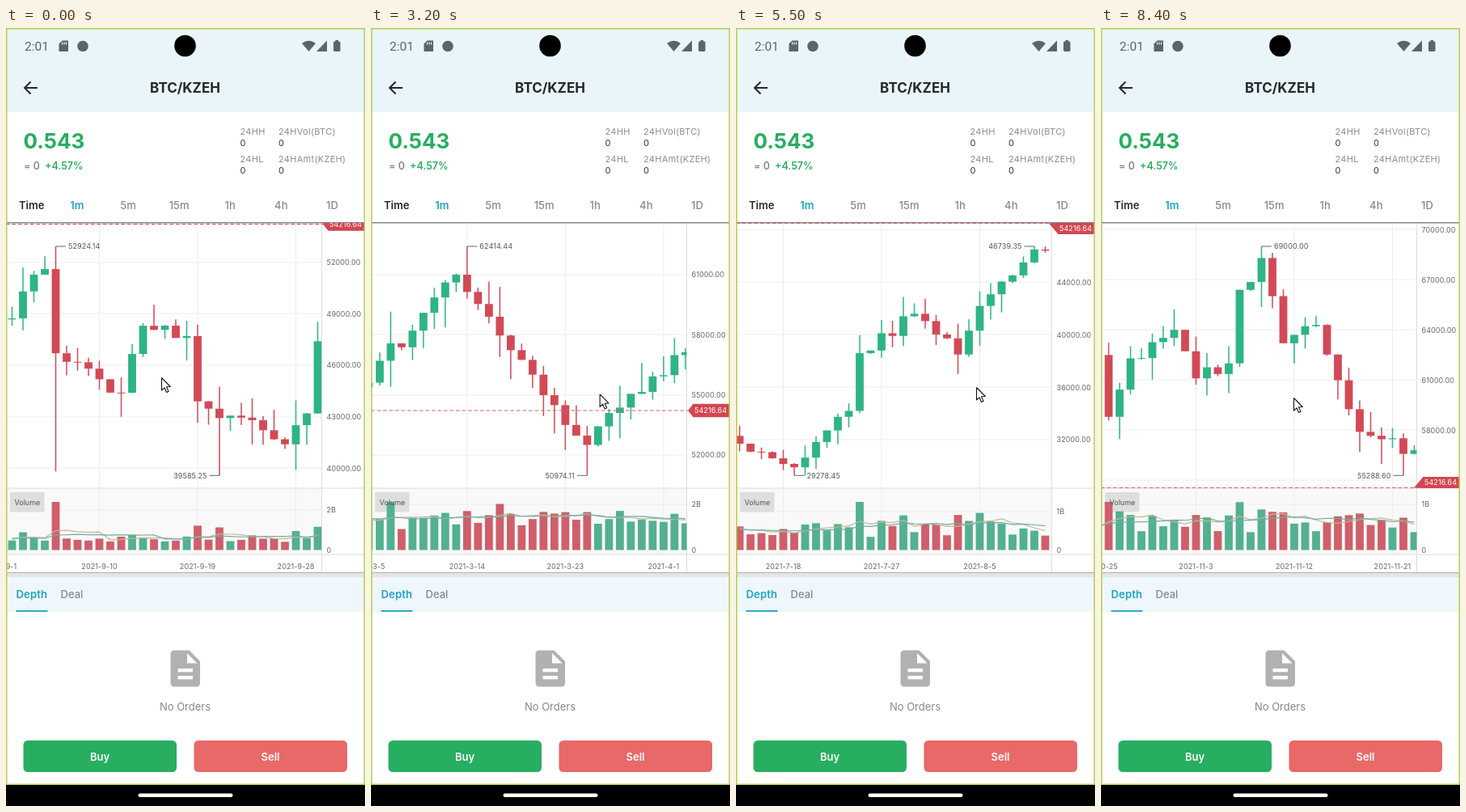
These frames come from a looping animation (444 px wide and 962 px high, 8700 ms). An HTML page with a canvas:

```html
<!DOCTYPE html>
<html lang="en">
<head>
<meta charset="utf-8">
<title>Price chart</title>
<style>
html, body { margin: 0; width: 100%; height: 100%; overflow: hidden; background: #fff; }
canvas { display: block; }
</style>
</head>
<body>
<canvas id="stage" width="444" height="962"></canvas>
<script>
const ctx = document.getElementById('stage').getContext('2d');
const LOOP = 8700, STEP = 100;
const DAYS = 291, DAY = 13.5, BODY = 9.8;
const TOP = 241, SPLIT = 569, FOOT = 651, AXIS = 390.5;
const HIGH_Y = 270, LOW_Y = 553.3, VOL_Y = 645.5, VOL_H = 59.5;
const FIRST_OPEN = 40.83, LAST_PRICE = 54.21664, TICK_ORIGIN = 40;
const UP = '#2eb486', DOWN = '#d14a56', VOL_UP = '#53b091', VOL_DOWN = '#cf5f6a';
const GREEN = '#27ae60', BLUE = '#1ba3c6', GREY = '#888', DARK = '#25282b', STATUS = '#5a646a';
const LABEL = '#666', GRID = '#ededed', EDGE = '#dcdcdc';

// Turning points of the closing price: [day, thousands]
const trend = [[0, 37.9], [1, 43.6], [2, 46.8], [8, 48], [14, 57.4], [16, 48.6], [35, 61], [47, 52.5], [66, 63],
  [75, 49.8], [77, 50.4], [82, 57.2], [92, 58.3], [94, 55.5], [100, 43], [101, 37.3], [122, 33.4], [128, 40],
  [158, 31.7], [163, 29.9], [168, 34.2], [169, 38.6], [174, 41.6], [178, 38.5], [180, 42.2], [185, 46.5],
  [206, 47.5], [211, 51.6], [212, 46.7], [218, 44.4], [220, 48.3], [224, 47.7], [225, 43.9], [233, 41.4],
  [235, 43.2], [236, 47.4], [261, 62.5], [262, 58.8], [264, 62.3], [268, 64], [270, 61.1], [273, 62],
  [274, 66.4], [276, 68.3], [278, 63.2], [281, 64.3], [285, 57.9], [290, 56.8]];
const peaks = [[15, 58.32618], [92, 59.522], [185, 46.73935], [212, 52.92414], [276, 69]];
const troughs = [[1, 37.351], [16, 44.91], [101, 29.00059], [163, 29.27845], [212, 39.82], [227, 39.58525], [289, 55.2886]];

const scrollKeys = [[500, -2800.5], [1400, -2747.5], [2200, 162], [2600, 162], [3900, -984.5], [5500, -2128.5],
  [6500, -2724], [7800, -3527.5]];
const pointerKeys = [[500, 192, 432], [1300, 225, 444], [2200, 402, 462], [2500, 332, 463], [2600, 332, 463],
  [3900, 225, 440], [5500, 297, 444], [6500, 196, 451], [7800, 238, 457]];

const clamp = (v, lo, hi) => Math.min(hi, Math.max(lo, v));
const random = n => { const s = Math.sin(n * 127.1 + 11.7) * 43758.5453; return s - Math.floor(s); };

function track(keys, t, channel = 1) {
  const i = keys.findIndex(k => k[0] >= t);
  if (i < 0) return keys[keys.length - 1][channel];
  if (i === 0) return keys[0][channel];
  const a = keys[i - 1], b = keys[i];
  return a[channel] + (b[channel] - a[channel]) * (t - a[0]) / (b[0] - a[0]);
}

// A wick reaches the extreme on its own day and stays inside it on the days around.
function limitWick(d, price, body, extremes, nearer) {
  const own = extremes.find(e => e[0] === d);
  if (own) return own[1];
  const near = extremes.filter(e => Math.abs(e[0] - d) <= 10).map(e => e[1]);
  const inside = nearer(price, ...near);
  return nearer === Math.min ? Math.max(body, inside) : Math.min(body, inside);
}

function buildCandles() {
  const list = [];
  let open = FIRST_OPEN;
  for (let d = 0; d < DAYS; d++) {
    const turning = trend.some(k => k[0] === d);
    const close = track(trend, d) + (turning ? 0 : random(d) - .5);
    const upper = Math.max(open, close), lower = Math.min(open, close);
    const high = limitWick(d, upper + 1.6 * random(d + 400) ** 2, upper, peaks, Math.min);
    const low = limitWick(d, lower - 1.6 * random(d + 800) ** 2, lower, troughs, Math.max);
    const [base, gain] = d < 130 ? [.8, .35] : [.3, .16];
    list.push({ d, open, close, high, low, volume: base + gain * (high - low) });
    open = close;
  }
  return list;
}
const candles = buildCandles();

function rect(x, y, w, h, color) { ctx.fillStyle = color; ctx.fillRect(x, y, w, h); }

function shape(points, color) {
  ctx.beginPath();
  points.forEach(p => ctx.lineTo(...p));
  ctx.closePath();
  ctx.fillStyle = color;
  ctx.fill();
}

function line(points, color, width = 1) {
  ctx.beginPath();
  points.forEach(p => ctx.lineTo(...p));
  ctx.strokeStyle = color;
  ctx.lineWidth = width;
  ctx.stroke();
}

function round(x, y, w, h, r, color) {
  ctx.beginPath();
  ctx.roundRect(x, y, w, h, r);
  ctx.fillStyle = color;
  ctx.fill();
}

function disc(x, y, r, color) {
  ctx.beginPath();
  ctx.arc(x, y, r, 0, 7);
  ctx.fillStyle = color;
  ctx.fill();
}

// y is the middle of the capital letters
function text(str, x, y, size, color, weight = 400, align = 'left', spacing = 0, family = 'Inter') {
  ctx.font = `${weight} ${size}px ${family}, sans-serif`;
  ctx.letterSpacing = spacing + 'px';
  ctx.textAlign = align;
  ctx.fillStyle = color;
  ctx.fillText(str, x, y + size * .364);
}

function chartText(str, x, y, color = LABEL, align = 'left') {
  text(str, x, y, 9, color, 400, align, .1);
}

function clipped(x, y, w, h, draw) {
  ctx.save();
  ctx.beginPath();
  ctx.rect(x, y, w, h);
  ctx.clip();
  draw();
  ctx.restore();
}

function drawStatusBar() {
  text('2:01', 23, 22.4, 15.5, STATUS, 400, 'left', 0, 'Roboto');
  shape([[69.5, 15.5], [77, 15.5], [77, 29], [65.5, 29], [65.5, 19.5]], STATUS);
  for (let x = 69; x < 75; x += 2.5) rect(x, 17.5, 1.2, 3, '#eaf5fa');
  disc(95, 22.5, 6.8, STATUS);
  disc(221.5, 22, 13.3, '#000');
  ctx.beginPath();
  ctx.moveTo(374.5, 29);
  ctx.lineTo(366, 19);
  ctx.quadraticCurveTo(374.5, 12.5, 383, 19);
  ctx.fillStyle = STATUS;
  ctx.fill();
  shape([[397, 15.5], [397, 29], [384, 29]], STATUS);
  round(405, 16.5, 8.5, 12.5, 1.5, STATUS);
  rect(407.5, 15, 3.5, 2, STATUS);
}

function drawHeader() {
  rect(0, 0, 444, 104, '#eaf5fa');
  drawStatusBar();
  line([[39, 74], [23, 74]], DARK, 2);
  line([[30.5, 66.5], [23, 74], [30.5, 81.5]], DARK, 2);
  text('BTC/KZEH', 221.5, 74, 17, DARK, 700, 'center');
}

function drawSummary() {
  text('0.543', 21.5, 139.5, 26, GREEN, 700);
  text('= 0', 22, 170.5, 12.5, '#777', 500);
  text('+4.57%', 48, 170.5, 12.5, GREEN, 600);
  [['24HH', '24HVol(BTC)'], ['24HL', '24HAmt(KZEH)']].forEach((row, r) => row.forEach((label, c) => {
    const x = 289.5 + c * 47.5, y = 128 + r * 33.5;
    text(label, x, y, 11, '#8c8c8c', 400, 'left', .3);
    text('0', x, y + 14, 11, '#333');
  }));
  text('Time', 16, 219.5, 13, DARK, 600);
  ['1m', '5m', '15m', '1h', '4h', '1D'].forEach((s, i) =>
    text(s, 87.9 + i * 63.1, 219, 13, i ? GREY : BLUE, i ? 500 : 600, 'center'));
}

function drawEmptyState() {
  round(203.5, 769.5, 36.5, 45, 4.5, '#b1b1b1');
  shape([[226, 769], [241, 769], [241, 784]], '#fff');
  shape([[224, 773], [224, 785.5], [236.5, 785.5]], '#fff');
  rect(212.5, 792, 18.5, 4.3, '#fff');
  rect(212.5, 801, 18.5, 4.3, '#fff');
  text('No Orders', 221.5, 839.5, 13, GREY, 400, 'center');
}

function drawFooter() {
  rect(0, 673, 444, 1, '#b0b0b0');
  rect(0, 674, 444, 5, '#e4e5e6');
  rect(0, 679, 444, 43, '#eff7fd');
  text('Depth', 12.5, 700, 13, BLUE, 600, 'left', .2);
  text('Deal', 67.5, 700, 13, GREY, 500);
  rect(12.5, 720, 39, 1.8, BLUE);
  drawEmptyState();
  round(21.5, 881, 189.5, 39, 5.5, GREEN);
  round(232.5, 881, 189.5, 39, 5.5, '#e96868');
  text('Buy', 116, 901, 13, '#fff', 600, 'center');
  text('Sell', 327, 901, 13, '#fff', 600, 'center');
  ctx.strokeStyle = '#b4d04a';
  ctx.lineWidth = 1.5;
  ctx.strokeRect(.75, .75, 442.5, 934.5);
  rect(0, 936, 444, 26, '#000');
  round(163.5, 946.5, 117, 4.5, 2.25, '#fff');
}

function niceStep(value) {
  const unit = 10 ** Math.floor(Math.log10(value)), f = value / unit;
  return (f < 6.5 ? Math.max(1, Math.round(f)) : 8) * unit;
}

function dateOf(d) {
  const date = new Date(Date.UTC(2021, 1, 6 + d));
  return `2021-${date.getUTCMonth() + 1}-${date.getUTCDate()}`;
}

const money = thousands => (thousands * 1000).toFixed(2);

function mark(x, y, price) {
  const side = x < 222 ? 1 : -1;
  line([[x, y], [x + side * 12.5, y]], LABEL);
  chartText(money(price), x + side * 15.5, y, '#555', side > 0 ? 'left' : 'right');
}

function horizontal(y, label) {
  rect(0, Math.round(y) - .5, AXIS, 1, GRID);
  chartText(label, 396.5, y);
}

function drawAverage(days, visible, xOf, scale, color) {
  const points = visible.filter(c => c.d >= days - 1).map(c => {
    const sum = candles.slice(c.d - days + 1, c.d + 1).reduce((s, k) => s + k.volume, 0);
    return [xOf(c.d), VOL_Y - sum / days * scale];
  });
  line(points, color, 1.2);
}

function drawCandle(c, x, yOf, volScale) {
  const up = c.close >= c.open, color = up ? UP : DOWN, left = x - BODY / 2;
  const y = yOf(Math.max(c.open, c.close)), top = yOf(c.high), volume = c.volume * volScale;
  rect(x - .75, top, 1.5, yOf(c.low) - top, color);
  rect(left, y, BODY, Math.max(1, yOf(Math.min(c.open, c.close)) - y), color);
  rect(left, VOL_Y - volume, BODY, volume, up ? VOL_UP : VOL_DOWN);
}

function drawDates(xOf) {
  for (let d = 0; d < DAYS; d += 9) {
    if (xOf(d) > AXIS + DAY / 2) break;
    rect(xOf(d) - .5, TOP, 1, FOOT - TOP, GRID);
    chartText(dateOf(d), xOf(d), 666, LABEL, 'center');
  }
}

function drawChart(offset) {
  const xOf = d => offset + d * DAY;
  const visible = candles.filter(c => xOf(c.d) > -BODY / 2 && xOf(c.d) < AXIS + BODY / 2);
  const top = visible.reduce((a, b) => b.high > a.high ? b : a);
  const bottom = visible.reduce((a, b) => b.low < a.low ? b : a);
  const scale = (LOW_Y - HIGH_Y) / (top.high - bottom.low);
  const yOf = p => HIGH_Y + (top.high - p) * scale;
  const maxVolume = Math.max(...visible.map(c => c.volume));
  const volScale = VOL_H / maxVolume, volTick = Math.max(1, Math.round(maxVolume));

  rect(0, SPLIT, AXIS, FOOT - SPLIT, '#f9f9f9');
  const step = niceStep((SPLIT - TOP) / scale / 5);
  const floor = bottom.low - (SPLIT - LOW_Y - 4) / scale;
  let price = TICK_ORIGIN + Math.ceil((floor - TICK_ORIGIN) / step) * step;
  for (; yOf(price) > TOP + 4; price += step) horizontal(yOf(price), money(price));
  horizontal(VOL_Y - volTick * volScale, volTick + 'B');
  chartText('0', 396.5, VOL_Y);

  clipped(0, TOP, AXIS, 432, () => drawDates(xOf));
  rect(0, SPLIT - .5, 444, 1, EDGE);
  rect(0, FOOT - .5, 444, 1, EDGE);
  rect(390, TOP, 1, 432, EDGE);
  round(5, 574, 42.5, 24.5, 1, '#dedede');

  clipped(0, TOP, AXIS, FOOT - TOP, () => {
    visible.forEach(c => drawCandle(c, xOf(c.d), yOf, volScale));
    drawAverage(5, visible, xOf, volScale, '#c6b78f');
    drawAverage(10, visible, xOf, volScale, '#69b0a6');
    mark(xOf(top.d), HIGH_Y, top.high);
    mark(xOf(bottom.d), LOW_Y, bottom.low);
  });
  text('Volume', 10.5, 586.5, 9, '#555');
  rect(0, TOP - 1, 444, 1.5, '#858585');
  drawLastPrice(yOf(LAST_PRICE));
}

function drawLastPrice(y) {
  const lineY = clamp(y, TOP + .5, SPLIT - .5);
  const outside = y < TOP || y > SPLIT;
  const half = outside ? 7 : 8.3;
  const tagY = outside ? clamp(y, TOP + half, SPLIT - half) : y;
  ctx.setLineDash([4.5, 3]);
  line([[0, lineY], [392, lineY]], '#d9606c', 1.2);
  ctx.setLineDash([]);
  clipped(380, TOP, 63, SPLIT - TOP, () => {
    shape([[outside ? 387 : 392, lineY], [398.5, tagY - half], [443, tagY - half],
      [443, tagY + half], [398.5, tagY + half]], '#d34652');
    chartText(money(LAST_PRICE), 400, tagY, '#fff');
  });
}

function drawPointer(x, y) {
  ctx.save();
  ctx.translate(x, y);
  ctx.lineJoin = 'round';
  const outline = [[.5, .5], [.5, 16], [4, 12.8], [6.5, 18.5], [9, 17.4], [6.5, 11.8], [11.3, 11.5]];
  shape(outline, '#fff');
  line([...outline, outline[0]], '#111', 1.1);
  ctx.restore();
}

function render(elapsed) {
  const t = Math.floor(elapsed % LOOP / STEP) * STEP;
  rect(0, 0, 444, 962, '#fff');
  drawHeader();
  drawSummary();
  drawChart(track(scrollKeys, t));
  drawFooter();
  drawPointer(track(pointerKeys, t, 1), track(pointerKeys, t, 2));
}

let origin;
function tick(now) {
  origin ??= now;
  render(now - origin);
  requestAnimationFrame(tick);
}
render(0);
requestAnimationFrame(tick);
</script>
</body>
</html>
```
